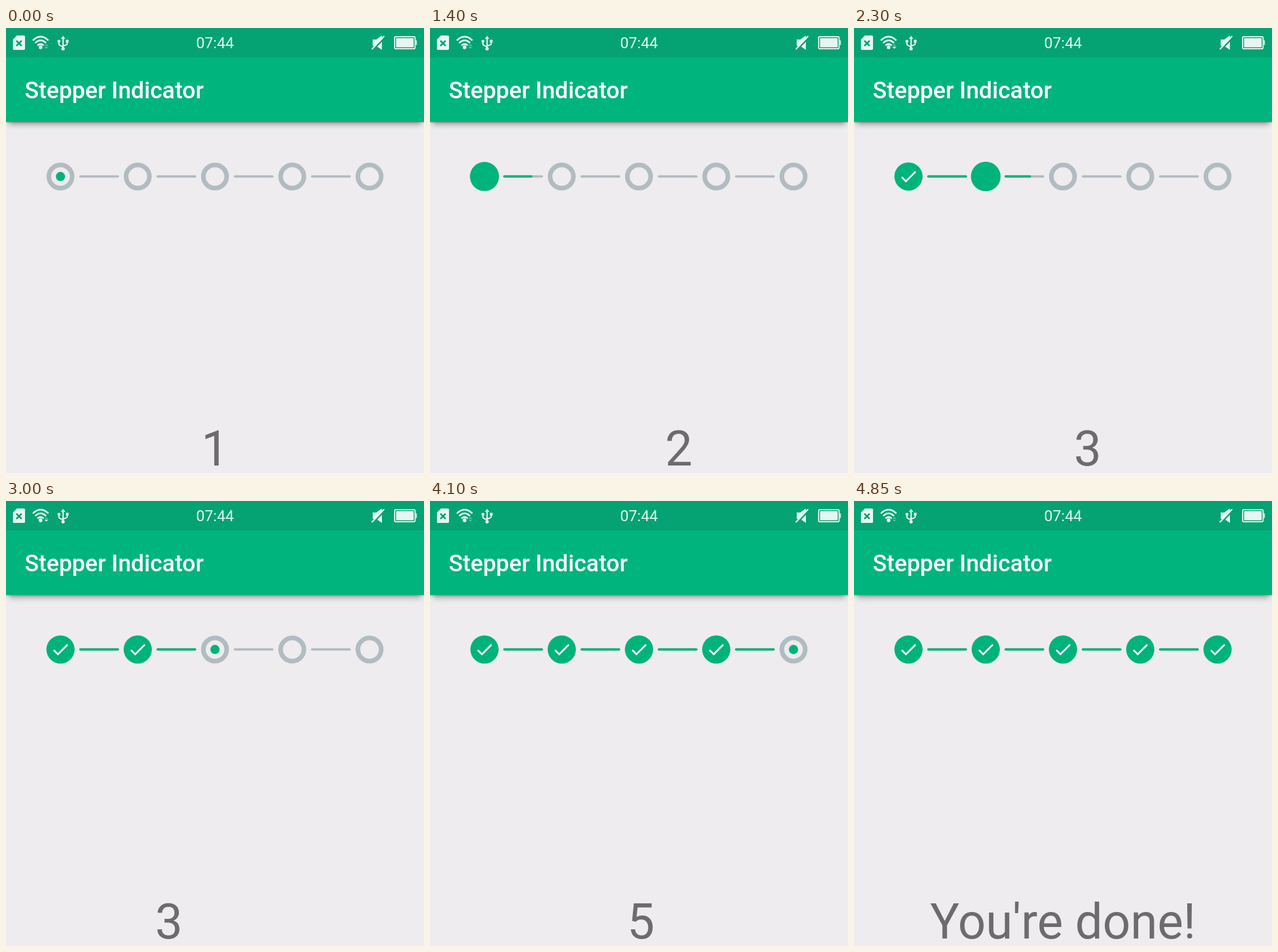
Write an HTML page that moves like this. It is 725 px wide and 772 px high and loops after 5050 ms.

```html
<!DOCTYPE html>
<html lang="en">
<head>
<meta charset="utf-8">
<title>Stepper Indicator</title>
<style>
  html, body { margin: 0; width: 100%; height: 100%; overflow: hidden; background: #eeecee; }
  #stage { position: relative; width: 725px; height: 772px; overflow: hidden; background: #eeecee; }
  .bar {
    position: absolute; left: 0; top: 0; width: 725px; height: 163px; background: #00b47d;
    box-shadow: 0 9px 10px -5px rgba(0,0,0,.36), 0 1px 3px rgba(0,0,0,.25);
  }
  svg { position: absolute; left: 0; top: 0; display: block; }
  text { font-family: Roboto, sans-serif; }
  .page { font-size: 84.6px; fill: #6d6b6e; text-anchor: middle; }
  .title { font-size: 40.3px; font-weight: 500; fill: #fff; }
  .clock { font-size: 26.4px; fill: #e6f6f0; text-anchor: middle; }
  .track { stroke: #b1bbc1; stroke-width: 4; stroke-linecap: round; }
  .done { stroke: #00b37b; stroke-width: 4; stroke-linecap: round; }
  .ring { fill: none; stroke: #b1bcc2; stroke-width: 8; }
  .dot { fill: #00b37b; }
  .check { fill: #fff; }
  .icon { fill: #e6f6f0; }
  .line { fill: none; stroke: #e6f6f0; }
</style>
</head>
<body>
<div id="stage">
  <div class="bar"></div>
  <svg width="725" height="772" viewBox="0 0 725 772">
    <rect width="725" height="51" fill="#05a374"/>

    <!-- SIM -->
    <path class="icon" d="M19 13H31Q33 13 33 15V36Q33 38 31 38H14Q12 38 12 36V20Z"/>
    <path d="M18 22L27 31M27 22L18 31" stroke="#05a374" stroke-width="3"/>

    <!-- Wi-Fi -->
    <g class="line" stroke-width="3">
      <path d="M46.500 21.500Q60 8.500 73.500 21.500"/>
      <path d="M50.500 26Q60 17 69.500 26"/>
      <path d="M54.500 30.200Q60 25.500 65.500 30.200"/>
    </g>
    <circle class="icon" cx="60" cy="33.500" r="3.200"/>
    <path class="icon" opacity=".35" d="M67 31L70 27.500L73 31Z"/>
    <path class="icon" id="download" d="M66.500 32.500H73.500L70 36Z"/>

    <!-- USB -->
    <g class="line" stroke-width="2.300">
      <path d="M99 17V36M91.800 23V28Q91.800 30.500 99 32M106.200 23V27Q106.200 29.500 99 31"/>
    </g>
    <path class="icon" d="M95.200 19L99 13.500L102.800 19Z"/>
    <circle class="icon" cx="99" cy="36" r="2.900"/>
    <circle class="icon" cx="91.800" cy="23" r="2.500"/>
    <path class="icon" d="M103.800 20.500H108.600V25.300H103.800Z"/>

    <text class="clock" x="362.500" y="35.300">07:44</text>

    <!-- Muted speaker -->
    <path class="icon" d="M636 20H642L652 13V38L642 31H636Z"/>
    <path d="M635 39.500L658 15.500" stroke="#05a374" stroke-width="3"/>
    <path class="line" d="M634.500 37L656 14" stroke-width="2.500"/>

    <!-- Battery -->
    <rect class="line" x="674" y="15" width="35.500" height="21" rx="2" stroke-width="2"/>
    <rect class="icon" x="676.500" y="17.500" width="30.500" height="16"/>
    <rect class="icon" x="710" y="21.500" width="2.500" height="8"/>

    <text class="title" x="32.500" y="122.300">Stepper Indicator</text>
    <g id="pages"></g>
    <g id="stepper"></g>
  </svg>
</div>
<script>
const LOOP = 5050, TICK = 50, WIDTH = 725, CENTER_Y = 257.6;
const STEPS = 5, ANIM = 200, DOT = 8, MARK = 24.4;

// One swipe per step: drag from `start` (at offset `from`) to `release` (at offset `to`), then settle.
const swipes = [
  { start: 1200, from: 60,  release: 1256, to: 270, settle: 458 },
  { start: 2100, from: 60,  release: 2170, to: 382, settle: 382 },
  { start: 3000, from: 80,  release: 3045, to: 235, settle: 420 },
  { start: 3800, from: 130, release: 3860, to: 400, settle: 400 },
  { start: 4600, from: 179, release: 4632, to: 310, settle: 215 }
];

const clamp = x => Math.min(1, Math.max(0, x));
const decelerate = x => 1 - (1 - x) ** 2;
const quint = x => 1 - (1 - x) ** 5;

function add(parent, tag, attrs, text = '') {
  const el = document.createElementNS(parent.namespaceURI, tag);
  for (const key in attrs) el.setAttribute(key, attrs[key]);
  el.textContent = text;
  return parent.appendChild(el);
}

const byId = id => document.getElementById(id);
const show = (el, on) => el.setAttribute('visibility', on ? 'visible' : 'hidden');

const pageLayer = byId('pages');
['1', '2', '3', '4', '5', "You're done!"].forEach((label, i) =>
  add(pageLayer, 'text', { class: 'page', x: 362.5 + i * WIDTH, y: 759 }, label));

const stepLayer = byId('stepper');
const steps = Array.from({ length: STEPS }, (_, i) => {
  const cx = 94.5 + 134 * i, x1 = cx + 34.5, x2 = cx + 99.5;
  const line = { x1, x2, y1: CENTER_Y, y2: CENTER_Y };
  const hasLine = i < STEPS - 1;
  if (hasLine) add(stepLayer, 'line', { class: 'track', ...line });
  const done = hasLine && add(stepLayer, 'line', { class: 'done', ...line });
  add(stepLayer, 'circle', { class: 'ring', cx, cy: CENTER_Y, r: 20.2 });
  const dot = add(stepLayer, 'circle', { class: 'dot', cx, cy: CENTER_Y });
  const check = add(stepLayer, 'path', {
    class: 'check',
    d: 'M9 16.17L4.83 12l-1.42 1.41L9 19 21 7l-1.41-1.41z',
    transform: `translate(${cx} ${CENTER_Y}) scale(1.48) translate(-12 -12)`
  });
  return { x1, x2, done, dot, check };
});

// Grow from one radius to a peak, then fall back to the resting radius.
function pop(from, peak, rest, progress) {
  const p = decelerate(clamp(progress)) * 2;
  return p < 1 ? from + (peak - from) * p : peak + (rest - peak) * (p - 1);
}

function pageOffset(t) {
  return swipes.reduce((sum, s) => {
    if (t < s.start) return sum;
    if (t < s.release)
      return sum + s.from + (s.to - s.from) * (t - s.start) / (s.release - s.start);
    return sum + s.to + (WIDTH - s.to) * quint(clamp((t - s.release) / s.settle));
  }, 0);
}

function drawStep(step, i, t) {
  const leave = (t - swipes[i].release) / ANIM;
  const enter = i ? (t - swipes[i - 1].release) / ANIM - 1 : 1;
  const radius = leave >= 0
    ? pop(DOT, MARK * 1.22, MARK, leave)
    : enter > 0 ? pop(0, DOT * 1.4, DOT, enter) : 0;
  step.dot.setAttribute('r', radius);
  show(step.check, leave >= 1);
  if (step.done) {
    const p = clamp(leave);
    show(step.done, p > 0);
    step.done.setAttribute('x2', step.x1 + (step.x2 - step.x1) * p);
  }
}

function render(t) {
  pageLayer.setAttribute('transform', `translate(${-pageOffset(t)} 0)`);
  steps.forEach((step, i) => drawStep(step, i, t));
  byId('download').setAttribute('opacity', t >= 1900 && t < 3100 ? 1 : .35);
}

const origin = performance.now();
function frame() {
  const t = (performance.now() - origin + 3) % LOOP;
  render(Math.floor(t / TICK) * TICK);
  requestAnimationFrame(frame);
}
render(0);
requestAnimationFrame(frame);
</script>
</body>
</html>
```
